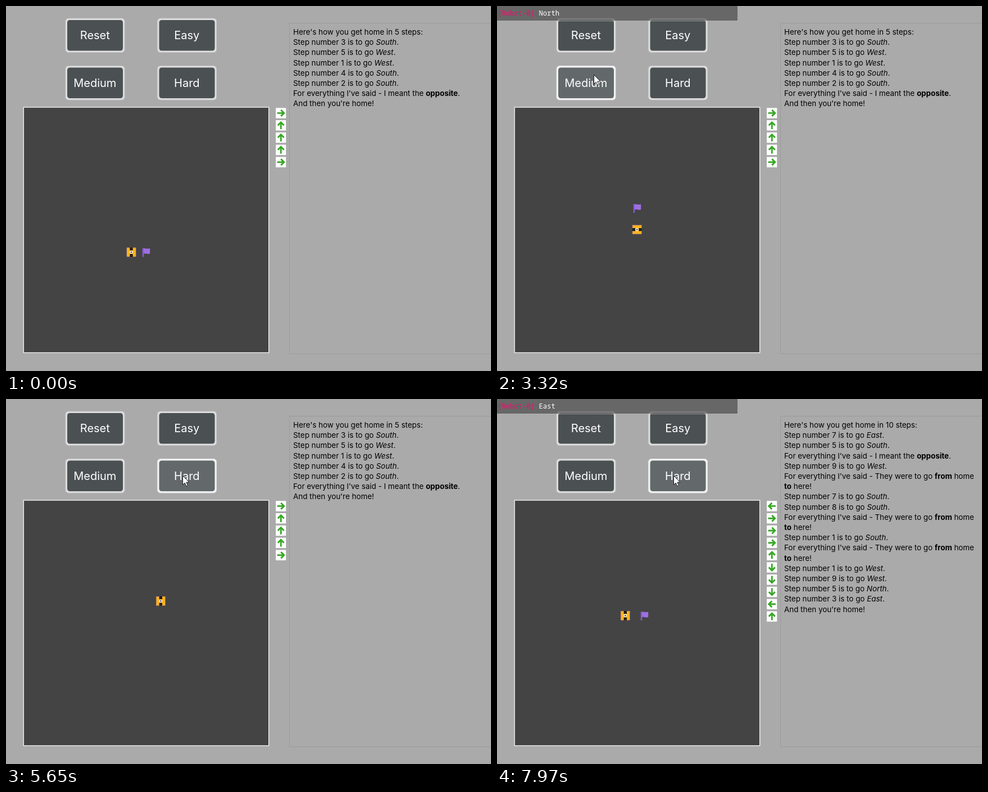
Write an HTML page with a canvas that moves like this. It is 863 px wide and 649 px high and loops after 8 s.

```html
<!DOCTYPE html>
<html lang="en">
<head>
<meta charset="utf-8">
<title>Way home</title>
<style>
html, body { margin: 0; width: 100%; height: 100%; overflow: hidden; background: #aaa; }
canvas { display: block; }
</style>
</head>
<body>
<canvas id="stage" width="863" height="649"></canvas>
<script>
const ctx = document.getElementById('stage').getContext('2d');
const LOOP = 8000, CELL = 26.15, TURN = 600, MESSAGE_LIFE = 1330, HARD_CLICK = 5750;
const DIRS = {
  E: { name: 'East', x: 1, y: 0, angle: 0 },
  S: { name: 'South', x: 0, y: 1, angle: Math.PI / 2 },
  W: { name: 'West', x: -1, y: 0, angle: Math.PI },
  N: { name: 'North', x: 0, y: -1, angle: -Math.PI / 2 }
};

// _italic_ and *bold*
const OPPOSITE = "For everything I've said - I meant the *opposite*.";
const REVERSED = ["For everything I've said - They were to go *from* home", '*to* here!'];
const step = (n, key) => `Step number ${n} is to go _${DIRS[key].name}_.`;
const MEDIUM_TEXT = [
  "Here's how you get home in 5 steps:",
  step(3, 'S'), step(5, 'W'), step(1, 'W'), step(4, 'S'), step(2, 'S'),
  OPPOSITE, "And then you're home!"
];
const HARD_TEXT = [
  "Here's how you get home in 10 steps:",
  step(7, 'E'), step(5, 'S'), OPPOSITE, step(9, 'W'), ...REVERSED,
  step(7, 'S'), step(8, 'S'), ...REVERSED, step(1, 'S'), ...REVERSED,
  step(1, 'W'), step(9, 'W'), step(5, 'N'), step(3, 'E'), "And then you're home!"
];

const BUTTONS = [['Reset', 105.5, 21.5], ['Easy', 269, 21.5], ['Medium', 105.5, 106], ['Hard', 269, 106]];

const clamp = v => Math.max(0, Math.min(1, v));
const lerp = (a, b, k) => a + (b - a) * k;
const easeOut = k => 1 - (1 - k) ** 2;

// Each leg turns the robot first when its heading changes, then drives one cell.
function planRoute(path, x, y, time, moveTime) {
  let heading = 'E';
  const legs = [...path].map(key => {
    const dir = DIRS[key];
    const go = time + (key === heading ? 0 : TURN);
    const leg = {
      dir, begin: time, go, end: go + moveTime, turnFrom: DIRS[heading].angle,
      x, y, toX: x + dir.x * CELL, toY: y + dir.y * CELL
    };
    x = leg.toX; y = leg.toY; time = leg.end; heading = key;
    return leg;
  });
  return { path, legs };
}
const MEDIUM = planRoute('ENNNE', 223, 437.7, 1060, 655);
const HARD = planRoute('WEEENSSSWN', 236, 385.2, 6200, 335);

function roundRect(x, y, w, h, r, fill) {
  ctx.beginPath();
  ctx.roundRect(x, y, w, h, r);
  ctx.fillStyle = fill;
  ctx.fill();
}

function polygon(points) {
  ctx.beginPath();
  points.forEach(([x, y]) => ctx.lineTo(x, y));
  ctx.closePath();
}

function at(x, y, angle, draw) {
  ctx.save();
  ctx.translate(x, y);
  ctx.rotate(angle);
  draw();
  ctx.restore();
}

function drawButton([label, x, y], cursor) {
  const hover = cursor && cursor.x > x && cursor.x < x + 106 && cursor.y > y && cursor.y < y + 61;
  roundRect(x, y, 106, 61.5, 6, hover ? '#e0e0e0' : '#c8c8c8');
  roundRect(x + 1, y + 1, 104, 59.5, 5, hover ? '#f4f4f4' : '#dedede');
  roundRect(x + 3.5, y + 3.5, 99, 54.5, 4.5, hover ? '#63696b' : '#4b5052');
  ctx.font = '20px Inter, sans-serif';
  ctx.textAlign = 'center';
  ctx.fillStyle = '#fff';
  ctx.fillText(label, x + 52.8, y + 37.5);
  ctx.textAlign = 'left';
}

function drawArrow(dir, y) {
  ctx.fillStyle = '#fff';
  ctx.fillRect(480, y - 9.2, 18.2, 18.4);
  at(489.2, y, dir.angle, () => {
    ctx.strokeStyle = '#36a824';
    ctx.lineWidth = 2.9;
    ctx.beginPath();
    ctx.moveTo(-6.7, 0); ctx.lineTo(5.5, 0);
    ctx.moveTo(0, -5.5); ctx.lineTo(5.5, 0); ctx.lineTo(0, 5.5);
    ctx.stroke();
  });
}

function drawText(lines) {
  ctx.fillStyle = '#000';
  lines.forEach((line, i) => {
    let x = 511;
    for (const part of line.match(/\*[^*]+\*|_[^_]+_|[^*_]+/g)) {
      const style = part[0] === '*' ? 'bold ' : part[0] === '_' ? 'italic ' : '';
      const text = style ? part.slice(1, -1) : part;
      ctx.font = style + '13.4px Inter, sans-serif';
      ctx.fillText(text, x, 51 + i * 18.2);
      x += ctx.measureText(text).width;
    }
  });
}

function drawFlag(x, y) {
  at(x, y, 0, () => {
    ctx.fillStyle = '#9d6fe2';
    ctx.beginPath();
    ctx.moveTo(-5.8, -6.3);
    ctx.bezierCurveTo(-2, -8.5, 1, -4.5, 7, -7);
    ctx.lineTo(7, 2.4);
    ctx.bezierCurveTo(2, 5, 0, 0.5, -4, 3);
    ctx.closePath();
    ctx.fill();
    ctx.fillStyle = '#8b5bd3';
    ctx.fillRect(-6.4, -7, 2.4, 15.5);
  });
}

function drawRobot(x, y, angle) {
  at(x, y, angle, () => {
    ctx.fillStyle = '#ffb31c';
    ctx.fillRect(-8.2, -8.2, 16.4, 16.4);
    ctx.strokeStyle = '#7a58a0';
    ctx.lineWidth = 0.6;
    ctx.strokeRect(-8.2, -8.2, 16.4, 16.4);
    for (const top of [-8.3, 3.2]) {
      ctx.fillStyle = '#111';
      ctx.fillRect(-2.6, top, 5.2, 5.1);
      ctx.fillStyle = '#6b5a2c';
      ctx.fillRect(-0.7, top + 2, 1.4, 1.4);
    }
    ctx.fillStyle = '#fff';
    ctx.beginPath(); ctx.arc(0, 0, 2.6, 0, 7); ctx.fill();
    ctx.fillStyle = '#24237a';
    ctx.beginPath(); ctx.arc(0, 0, 1.2, 0, 7); ctx.fill();
  });
}

function drawRoute({ path, legs }, t) {
  [...path].forEach((key, i) => drawArrow(DIRS[key], 190.4 + i * 21.8));
  const next = legs.find(leg => t < leg.go);
  if (next) drawFlag(next.toX, next.toY);
  const leg = legs.find(l => t < l.end) || legs[legs.length - 1];
  const moved = clamp((t - leg.go) / (leg.end - leg.go));
  const turned = leg.go > leg.begin ? easeOut(clamp((t - leg.begin) / TURN)) : 1;
  drawRobot(lerp(leg.x, leg.toX, moved), lerp(leg.y, leg.toY, moved),
    lerp(leg.turnFrom, leg.dir.angle, turned));
}

function drawMessages({ legs }, t) {
  const shown = legs.filter(l => t >= l.begin && t < l.begin + MESSAGE_LIFE);
  if (!shown.length) return;
  const height = 27 + (shown.length - 1) * 32;
  ctx.fillStyle = 'rgba(54,54,54,.57)';
  ctx.fillRect(0, 0, 429, height);
  ctx.fillStyle = 'rgba(225,225,225,.6)';
  ctx.fillRect(0, height - 1, 429, 1);
  ctx.fillRect(428, 0, 1, height);
  ctx.font = '12.2px "Noto Sans Mono", monospace';
  shown.forEach((leg, i) => {
    const y = 17.3 + i * 32;
    if (i) {
      ctx.fillStyle = 'rgba(0,0,0,.06)';
      ctx.fillRect(0, y - 22, 428, 3);
    }
    ctx.fillStyle = '#e8106c';
    ctx.fillText('[Robot-0]', 1, y);
    ctx.fillStyle = '#fff';
    ctx.fillText(leg.dir.name, 74.5, y);
  });
}

function cursorAt(t) {
  if (t >= 270 && t < 300) return { x: 139, y: 622 };
  if (t < 440) return null;
  const arrive = easeOut(clamp((t - 440) / 90));
  const leave = easeOut(clamp((t - 5480) / 160));
  return {
    x: lerp(lerp(10, 172, arrive), 314, leave),
    y: lerp(lerp(96, 122, arrive), 136, leave)
  };
}

function drawCursor({ x, y }) {
  at(x + 0.5, y + 0.5, 0, () => {
    polygon([[0, 0], [0, 16], [3.7, 12.6], [6.3, 18.4], [8.9, 17.2], [6.3, 11.6], [11.4, 11.4]]);
    ctx.fillStyle = '#fff';
    ctx.fill();
    ctx.strokeStyle = '#222';
    ctx.lineWidth = 1;
    ctx.stroke();
  });
}

function render(t) {
  const hard = t >= HARD_CLICK;
  const route = hard ? HARD : MEDIUM;
  const cursor = cursorAt(t);
  ctx.fillStyle = '#aaa';
  ctx.fillRect(0, 0, 863, 649);
  ctx.lineWidth = 1;
  ctx.strokeStyle = '#9b9b9b';
  ctx.strokeRect(504.5, 30.5, 400, 588);
  BUTTONS.forEach(button => drawButton(button, cursor));
  ctx.fillStyle = '#444';
  ctx.fillRect(31, 180, 437, 436.5);
  ctx.strokeStyle = '#fff';
  ctx.lineWidth = 1.2;
  ctx.strokeRect(31.3, 180.1, 436.3, 436.3);
  drawText(hard ? HARD_TEXT : MEDIUM_TEXT);
  drawRoute(route, t);
  drawMessages(route, t);
  if (cursor) drawCursor(cursor);
}

const started = performance.now();
function tick() {
  render((performance.now() - started) % LOOP);
  requestAnimationFrame(tick);
}
tick();
</script>
</body>
</html>
```
